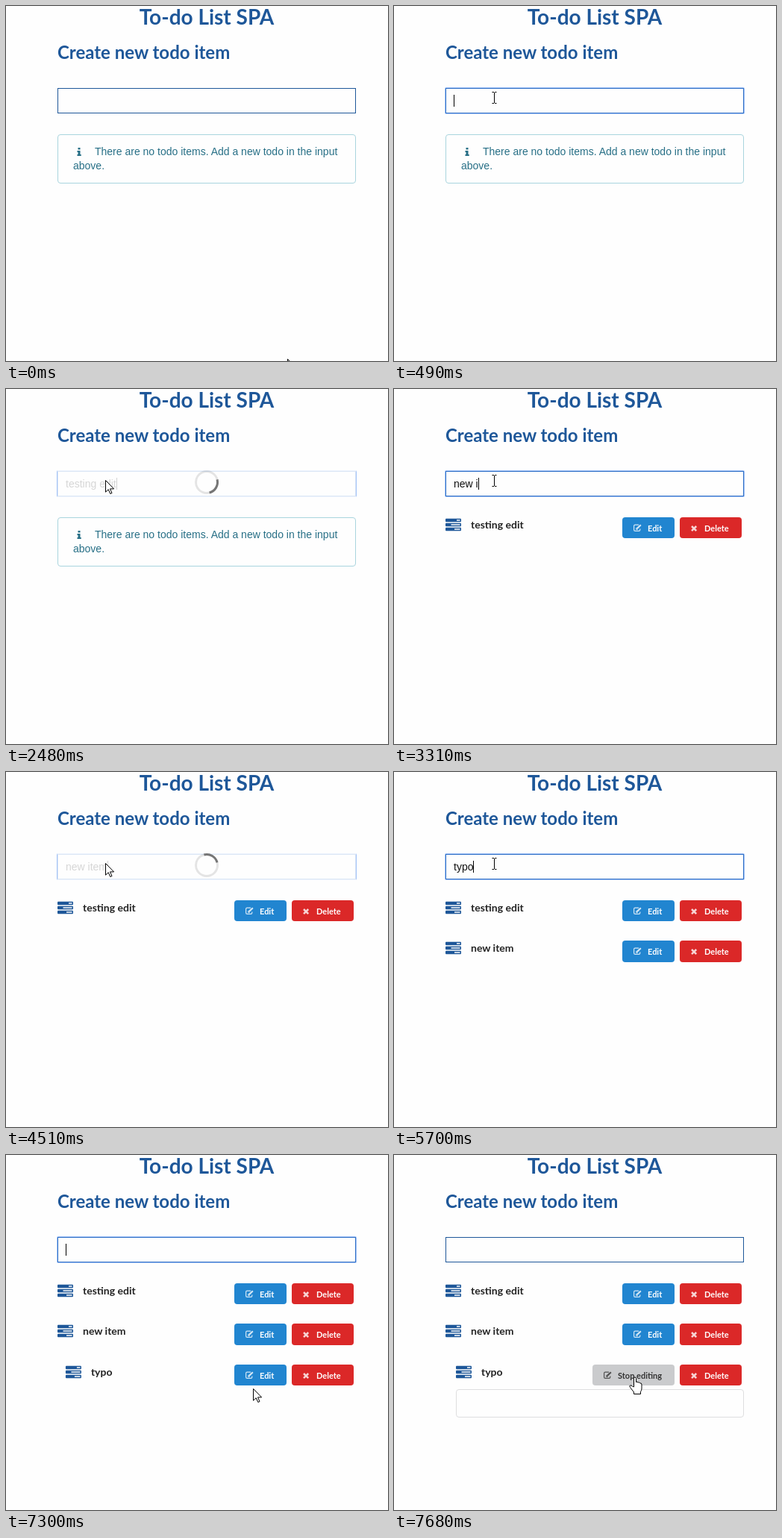
Animation of 512 by 476 pixels, one loop 8 s. Source, as an HTML page:

```html
<!DOCTYPE html>
<html lang="en">
<head>
<meta charset="utf-8">
<title>To-do List SPA</title>
<style>
  html, body { margin: 0; width: 100%; height: 100%; overflow: hidden; background: #fefefe; }
  svg { display: block; }
  text { white-space: pre; }
  .lato { font-family: Lato, sans-serif; font-weight: 700; }
  .sans { font-family: "Liberation Sans", Arial, sans-serif; font-size: 14px; }
  .head { fill: #1e5799; }
  .name { font-size: 14px; fill: #222; }
  .btn { font-size: 11px; fill: #fff; }
</style>
</head>
<body>
<svg width="512" height="476" viewBox="0 0 512 476">
  <defs>
    <path id="tasks" fill="#1e5799" fill-rule="evenodd" transform="scale(.01172)"
      d="M64 128H1728l64 64V448l-64 64H64L0 448V192ZM1280 256V384H1664V256Z
         M64 640H1728l64 64V960l-64 64H64L0 960V704ZM640 768V896H1664V768Z
         M64 1152H1728l64 64V1472l-64 64H64L0 1472V1216ZM1024 1280V1408H1664V1280Z"/>
    <g id="pencil" fill="none">
      <path stroke-width="1.2" d="M7 1.2H2.2Q.6 1.2 .6 2.8V7.8Q.6 9.4 2.2 9.4H7.2Q8.8 9.4 8.8 7.8V6.4"/>
      <path stroke-width="2.2" d="M4.4 6.4L9.8 1.2"/>
      <path stroke-width="1" d="M3.7 5.4V7.4H5.6"/>
    </g>
    <path id="times" stroke-width="2.5" d="M1 1L7.2 7.2M7.2 1L1 7.2"/>
  </defs>

  <g class="lato head">
    <text x="269" y="25" font-size="28" text-anchor="middle">To-do List SPA</text>
    <text x="69" y="70.5" font-size="24">Create new todo item</text>
  </g>

  <g id="message" fill="#276f86">
    <rect x="69.5" y="172.5" width="399" height="65" rx="3.5" fill="none" stroke="#a9d5de"/>
    <path d="M96.5 190h3v2.5h-3zM95.5 194h4v5h1.2v2h-5.2v-2h1v-3h-1z"/>
    <g class="sans">
      <text x="119" y="200">There are no todo items. Add a new todo in the input</text>
      <text x="90" y="219">above.</text>
    </g>
  </g>

  <g id="rows"></g>
  <rect id="editBox" x="83.5" y="314.5" width="385" height="37" rx="3.5" fill="#fefefe" stroke="#dededf"/>

  <rect id="ring" x="68.5" y="109.5" width="401" height="35" rx="1" fill="none" stroke="#a3c3f8"/>
  <rect id="field" x="69.5" y="110.5" width="399" height="33" fill="#fefefe"/>
  <text id="typed" class="sans" x="80" y="132" fill="#111"></text>
  <rect id="caret" y="119" width="1" height="16"/>

  <g id="loader">
    <rect x="69" y="109" width="400" height="36" fill="#fefefe" opacity=".83"/>
    <g fill="none" stroke-width="3">
      <circle cx="269" cy="125" r="14.5" stroke="#000" stroke-opacity=".1"/>
      <path id="arc" d="M258.75 114.75A14.5 14.5 0 0 1 279.25 114.75" stroke="#767676"/>
    </g>
  </g>

  <g id="arrow" fill="#fff" stroke="#000">
    <path d="M.5 .5V16.2L4.2 12.7L6.8 18.5L9 17.5L6.5 11.9H11.6Z"/>
  </g>
  <path id="beam" fill="none" stroke="#000" d="M-3 -7.5H-.5M.5 -7.5H3M0 -7V7M-3 7.5H-.5M.5 7.5H3" transform="translate(.5)"/>
  <path id="hand" fill="#fff" stroke="#000" stroke-linejoin="round"
    d="M-.5 13V1.5Q-.5 0 1 0T2.5 1.5V6.5Q4 5.5 5.2 7Q6.8 6.2 7.8 8Q10 7.4 10 10V15Q10 17.5 8.5 19.5V22.5H-.5V20L-5.5 13.5Q-7 11.5 -5.5 11T-2.5 12Z"/>
</svg>

<script>
const LOOP = 8000;
const $ = id => document.getElementById(id);
const show = (el, on) => { el.style.display = on ? '' : 'none'; };

const items = [
  { name: 'testing edit', at: 2520, top: 172, height: 28 },
  { name: 'new item', at: 4650, top: 226, height: 29 },
  { name: 'typo', at: 6150, top: 281, height: 28 }
];
const keys = [
  [790, 830, 1070, 1280, 1360, 1520, 1620, 1800, 1890, 1980, 2070, 2160],
  [2760, 2920, 3010, 3100, 3310, 3460, 3680, 4200],
  [5250, 5330, 5550, 5700]
];
// start, end, moment of zero rotation
const loads = [[2300, 2520, 2280], [4510, 4650, 4460], [5960, 6150, 5920]];
const FOCUS = 490, BLUR = 7600, EDIT = 7640, HOVER = 7510, ROW_HOVER = 7070;
const SPIN = 600, BLINK = 520;

// time, x, y
const path = [
  [0, 377, 473], [39, 377, 473], [40, 336, 402], [130, 254, 288], [220, 184, 190],
  [300, 144, 136], [350, 134, 123], [6620, 134, 123], [6650, 136, 137],
  [6780, 190, 215], [6900, 290, 310], [7000, 344, 332], [7080, 332, 314],
  [7420, 330, 312], [HOVER, 322, 298], [LOOP, 322, 298]
];

// every change of the field's text, in order
const entries = [[FOCUS, '']];
items.forEach((item, i) => {
  keys[i].forEach((t, n) => entries.push([t, item.name.slice(0, n + 1)]));
  entries.push([item.at, '']);
});

const button = (id, x, width, y, height, fill, icon, label, ink = '#fff') => `
  <g id="${id}">
    <rect x="${x}" y="${y}" width="${width}" height="${height}" rx="4" fill="${fill}"/>
    <use href="#${icon}" x="${x + 15}" y="${y + (icon === 'times' ? 11 : 9)}" stroke="${ink}" opacity=".8"/>
    <text class="lato btn" x="${x + (icon === 'times' ? 33 : 34)}" y="${y + 18.7}" style="fill:${ink}">${label}</text>
  </g>`;

$('rows').innerHTML = items.map(({ name, top, height }, i) => `
  <g id="row${i}">
    <g id="label${i}">
      <use href="#tasks" x="69" y="${top + .25}"/>
      <text class="lato name" x="103" y="${top + 15}">${name}</text>
    </g>
    ${button('edit' + i, 306, 70, top, height, '#2185d0', 'pencil', 'Edit')}
    ${button('delete' + i, 383, 83, top, height, '#db2828', 'times', 'Delete')}
  </g>`).join('') + button('stop', 266, 110, 281, 28, '#cacbcd', 'pencil', 'Stop editing', '#333');

const clamp = v => Math.max(0, Math.min(1, v));
const ease = p => 1 - (1 - p) ** 3 * (1 + 2 * p);

function pointer(t) {
  const i = Math.max(1, path.findIndex(p => p[0] > t));
  const [t0, x0, y0] = path[i - 1], [t1, x1, y1] = path[i];
  const p = clamp((t - t0) / (t1 - t0));
  return [Math.round(x0 + (x1 - x0) * p), Math.round(y0 + (y1 - y0) * p)];
}

function drawPointer(t, loading) {
  let [x, y] = pointer(t);
  const kind = t >= HOVER ? 'hand' : y < 145 && !loading ? 'beam' : 'arrow';
  if (loading) { x -= 1; y -= 1; }
  for (const id of ['arrow', 'beam', 'hand']) show($(id), id === kind);
  $(kind).setAttribute('transform', `translate(${kind === 'beam' ? x + .5 : x} ${y})`);
}

function drawField(t, load) {
  const focused = t >= FOCUS && t < BLUR;
  show($('ring'), focused);
  $('field').setAttribute('stroke', focused ? '#2f6fc4' : '#1e5799');

  const [since, text] = entries.filter(e => e[0] <= t).pop() || [0, ''];
  $('typed').textContent = text;
  show($('caret'), focused && Math.floor((t - since) / BLINK) % 2 === 0);
  const width = text ? $('typed').getComputedTextLength() : 0;
  $('caret').setAttribute('x', Math.round(80 + width));

  show($('loader'), load);
  if (load) $('arc').setAttribute('transform', `rotate(${(t - load[2]) / SPIN * 360} 269 125)`);
}

function drawRows(t) {
  show($('message'), t < items[0].at);
  items.forEach((item, i) => show($('row' + i), t >= item.at));
  const shift = 14 * ease(clamp((t - ROW_HOVER - 100) / 250));
  $('label2').setAttribute('transform', `translate(${shift})`);
  const editing = t >= EDIT;
  $('edit2').firstElementChild.setAttribute('fill', t >= HOVER ? '#1678c2' : '#2185d0');
  show($('edit2'), !editing);
  show($('stop'), editing);
  show($('editBox'), editing);
}

function frame() {
  const t = performance.now() % LOOP;
  const load = loads.find(l => t >= l[0] && t < l[1]);
  drawRows(t);
  drawField(t, load);
  drawPointer(t, load);
  requestAnimationFrame(frame);
}
frame();
</script>
</body>
</html>
```
